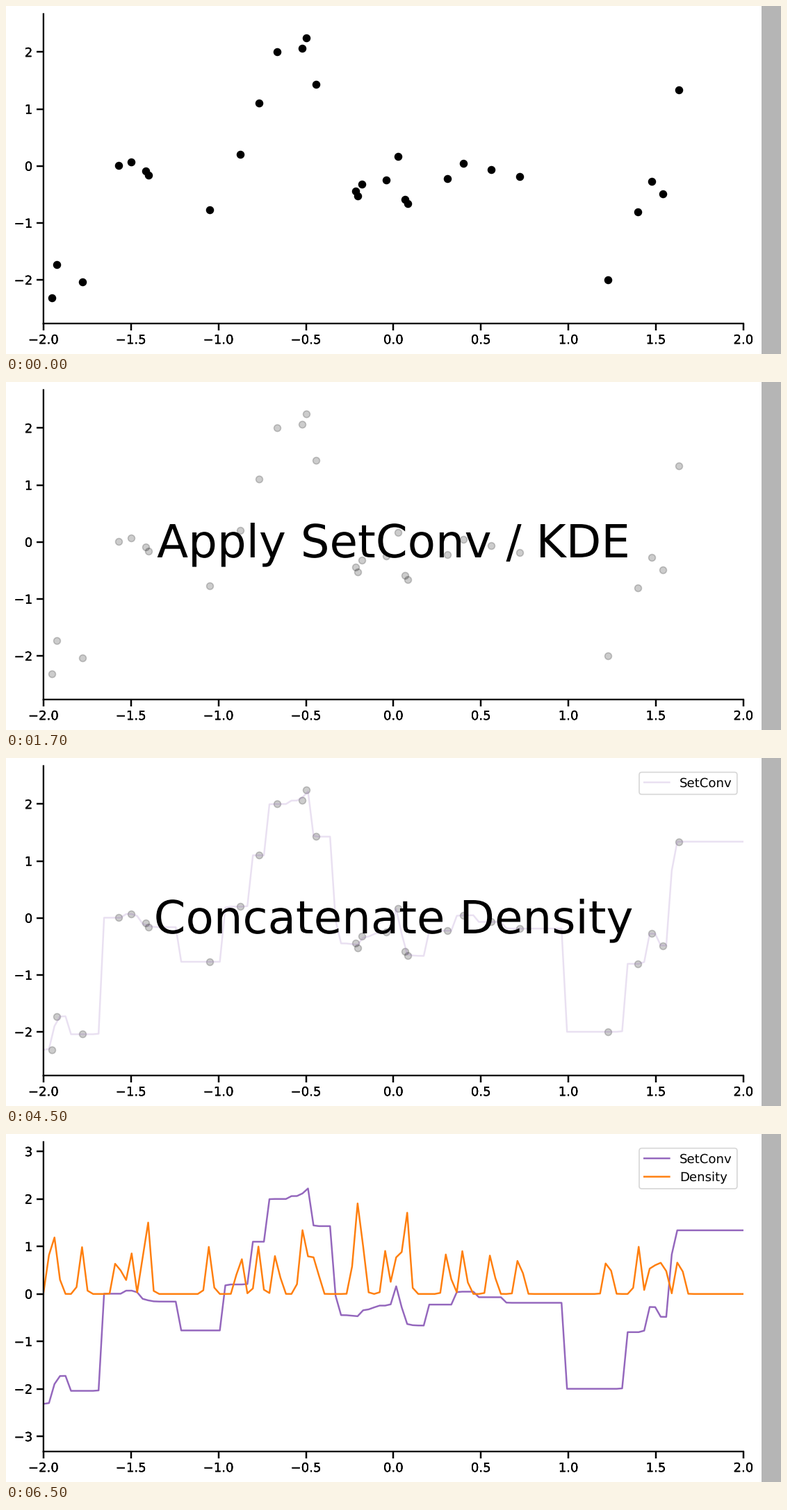
A matplotlib script for the animation above (8000 ms loop, 1115 px wide and 502 px high).

```python
import numpy as np
import matplotlib.pyplot as plt
from matplotlib.animation import FuncAnimation
from matplotlib.patches import Rectangle
from matplotlib.patheffects import Normal

W, H, DPI = 1115, 502, 128
PT = 0.925  # scale applied to all point sizes
LEFT, RIGHT, TOP, BOTTOM = 53.9, 1060.9, 11.5, 458.0
INTERVAL = 500
PURPLE, ORANGE = "tab:purple", "tab:orange"

plt.rcParams.update({
    "font.family": "DejaVu Sans", "font.size": 11 * PT, "text.hinting": "none",
    "path.snap": False,
    "axes.spines.top": False, "axes.spines.right": False,
    "axes.linewidth": 1.4 * PT, "lines.linewidth": 1.5 * PT,
    "patch.linewidth": PT, "legend.fontsize": 11 * PT,
})
for axis in ("xtick", "ytick"):
    plt.rcParams.update({
        f"{axis}.major.size": 6 * PT, f"{axis}.major.width": 1.5 * PT,
        f"{axis}.major.pad": 3.5 * PT, f"{axis}.labelsize": 11 * PT,
    })


def run(x, y, dx=0.013, dy=-0.075, count=2):
    """Evenly spaced dots along a straight line; a close pair by default."""
    return [(x + k * dx, y + k * dy) for k in range(count)]


# Single key dots, then close pairs, then straight runs
dots = [
    (-1.953, -2.315), (-1.923, -1.725), (-1.777, -2.04), (-1.572, 0.005),
    (-1.5, 0.07), (-1.05, -0.768), (-0.523, 2.06), (-0.498, 2.248),
    (-0.444, 1.428), (-0.179, -0.324), (-0.04, -0.245), (0.027, 0.165),
    (0.308, -0.224), (1.224, -1.997), (1.397, -0.804), (1.478, -0.274),
    (1.538, -0.483), (1.632, 1.34),
]
for x, y in [(-1.414, -0.086), (-0.217, -0.445), (0.067, -0.59)]:
    dots += run(x, y)
dots += run(-0.875, 0.2, 0.105, 0.9, 3) + run(0.4, 0.048, 0.16, -0.117, 3)
px, py = np.transpose(dots)

# Gaussian kernel density and normalised convolution on a regular grid
SCALE = 0.0147
grid = np.linspace(-2, 2, 128)
centres = grid / 1.0025 + 0.0006
weights = np.exp(-0.5 * ((centres[:, None] - px) / SCALE) ** 2)
density = weights.sum(axis=1)
set_conv = weights @ py / density

fig = plt.figure(figsize=(W / DPI, H / DPI), dpi=DPI, facecolor="white")
ax = fig.add_axes([LEFT / W, 1 - BOTTOM / H, (RIGHT - LEFT) / W, (BOTTOM - TOP) / H])
fig.add_artist(Rectangle((1087 / W, 0), 1 - 1087 / W, 1, color="#b5b5b5", lw=0))


def setup_axes(low, high):
    ax.clear()
    ax.set(xlim=(-2, 2), ylim=(low, high))
    ax.set_xticks(np.arange(-2, 2.1, 0.5))
    ax.set_yticks(range(int(low), int(high) + 1))
    # repeated passes give the labels their heavier look
    plt.setp(ax.get_xticklabels() + ax.get_yticklabels(),
             path_effects=[Normal()] * 3)


def draw_legend():
    ax.legend(loc="upper right", framealpha=0.8, edgecolor="0.8")


def data_scene(title=None, with_line=False):
    setup_axes(-2.764, 2.668)
    alpha = 0.2 if title else 1
    ax.scatter(px, py, s=(6 * PT) ** 2, c="black", linewidths=PT, alpha=alpha)
    if with_line:
        ax.plot(grid, set_conv, color=PURPLE, alpha=alpha, label="SetConv")
        draw_legend()
    if title:
        ax.text(0.5, 0.5, title, transform=ax.transAxes, fontsize=40 * PT,
                ha="center", va="center", path_effects=[Normal()])


def density_scene():
    setup_axes(-3.317, 3.2)
    ax.plot(grid, set_conv, color=PURPLE, label="SetConv")
    ax.plot(grid, density, color=ORANGE, label="Density")
    draw_legend()


SCENES = [
    lambda: data_scene(),
    lambda: data_scene("Apply SetConv / KDE"),
    lambda: data_scene(with_line=True),
    lambda: data_scene("Concatenate Density", with_line=True),
    density_scene,
]


def draw(frame):
    # the opening scene lasts one frame, later ones four
    SCENES[(frame + 3) // 4]()
    return []


anim = FuncAnimation(fig, draw, frames=8000 // INTERVAL, interval=INTERVAL,
                     repeat=True, repeat_delay=0, blit=False)
plt.show()
```
